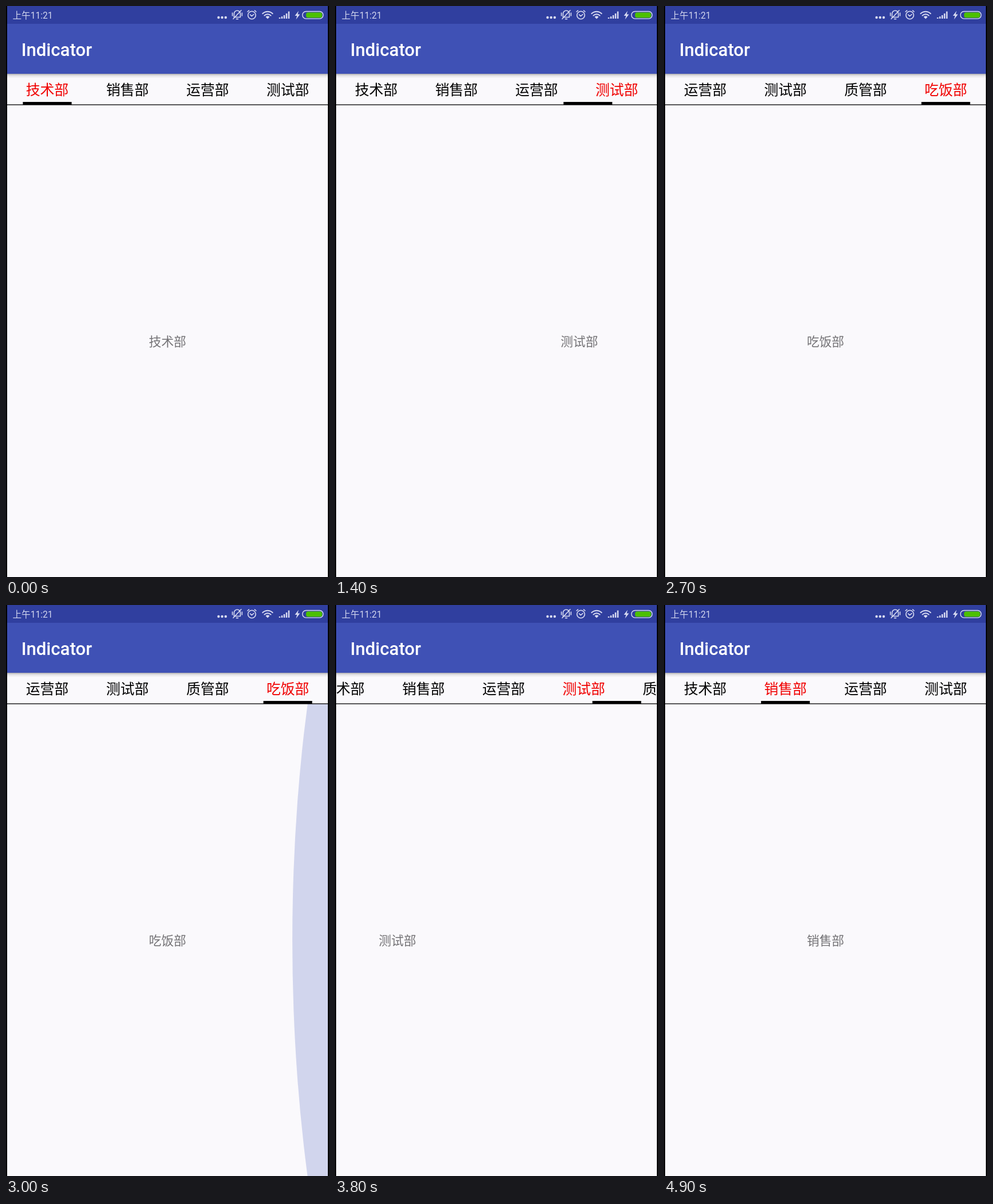
Write an HTML page that moves like this. It is 563 px wide and 994 px high and loops after 5100 ms.

```html
<!DOCTYPE html>
<html lang="zh-CN">
<head>
<meta charset="utf-8">
<title>Indicator</title>
<style>
html, body { margin: 0; width: 100%; height: 100%; overflow: hidden; background: #faf9fc; }
svg { display: block; font-family: "Noto Sans CJK SC", "Noto Sans CJK", "Noto Sans SC", sans-serif; }
.tab { font-size: 24.84px; text-anchor: middle; }
.page { font-size: 21.74px; text-anchor: middle; fill: #747376; }
.title { font: 500 31.06px Roboto, sans-serif; fill: #fff; }
.clock { font-family: Roboto, "Noto Sans CJK SC", "Noto Sans CJK", sans-serif; font-size: 15.6px; fill: #d3d7ef; }
.icons { fill: none; stroke: #d9dcf2; stroke-width: 1.6; stroke-linecap: round; stroke-linejoin: round; }
.icons .solid { fill: #d9dcf2; stroke: none; }
</style>
</head>
<body>
<svg width="563" height="994" viewBox="0 0 563 994">
  <defs>
    <linearGradient id="shade" x2="0" y2="1">
      <stop stop-color="#000" stop-opacity=".3"/>
      <stop offset=".4" stop-color="#000" stop-opacity=".09"/>
      <stop offset="1" stop-color="#000" stop-opacity="0"/>
    </linearGradient>
  </defs>
  <rect width="563" height="994" fill="#faf9fc"/>
  <g id="pages"></g>
  <ellipse id="glow" cy="583.5" ry="1231" fill="#3f51b5"/>

  <rect y="118" width="563" height="54" fill="#faf9fc"/>
  <g id="tabs"></g>
  <rect y="171.3" width="563" height="1.3"/>
  <rect id="bar" y="167" width="85" height="5"/>

  <rect y="118" width="563" height="8" fill="url(#shade)"/>
  <rect width="563" height="118" fill="#3f51b5"/>
  <rect width="563" height="31" fill="#303f9f"/>
  <text class="clock" x="11.5" y="22">上午11:21</text>
  <text class="title" x="26.8" y="87">Indicator</text>

  <g class="icons">
    <g class="solid">
      <circle cx="370.5" cy="20" r="2.2"/><circle cx="376.7" cy="20" r="2.2"/><circle cx="382.9" cy="20" r="2.2"/>
      <path d="M510 8.5L503.5 17H507.3L505.5 23.5L512.3 14.5H508.4Z"/>
    </g>
    <!-- muted bell -->
    <path d="M397.5 19.5V13.5A5.5 5.5 0 0 1 408.5 13.5V19.5H397.5M401.5 22.6H404.5M396 22.5L410 7.5M394.6 12V17M411.4 12V17"/>
    <!-- alarm clock -->
    <circle cx="428.5" cy="16" r="6.8"/>
    <path d="M425.5 15L428.3 17.7L432 14.5M421 10L423.5 7.8M436 10L433.5 7.8"/>
    <!-- wifi -->
    <path stroke-width="2" d="M447.3 13.2A12.5 12.5 0 0 1 464.7 13.2M450.4 16.6A8 8 0 0 1 461.6 16.6"/>
    <path class="solid" d="M452.5 19A5 5 0 0 1 459.5 19L456 22.5Z"/>
    <!-- signal -->
    <path stroke-width="2.5" stroke-linecap="butt" d="M477 22V20M481 22V18.3M485 22V16M489 22V13M493 22V9.5"/>
    <!-- battery -->
    <rect x="516.8" y="9.5" width="36" height="12.6" rx="6" stroke-width="1.4"/>
    <rect x="523" y="11.2" width="28" height="9.2" rx="3.5" fill="#4cc000" stroke="none"/>
  </g>
  <rect width="2" height="994"/>
  <rect x="561" width="2" height="994"/>
</svg>
<script>
const LOOP = 5100, TICK = 100;
const WIDTH = 559, TAB = WIDTH / 4, LEFT = 2;
const names = ['技术部', '销售部', '运营部', '测试部', '质管部', '吃饭部'];
// Each swipe: middle time, direction, delay of the tab strip behind the page (ms)
const swipes = [
  [560, 1, 17], [1019, 1, 17], [1358.3, 1, 19], [1902.8, 1, 10.4], [2440, 1, 17],
  [3400, -1, 17], [3768.2, -1, 17.6], [4244, -1, 17], [4628, -1, 17]
];

const get = id => document.getElementById(id);
const clamp = (v, lo, hi) => Math.min(hi, Math.max(lo, v));

function addLabels(group, type, step, y) {
  return names.map((name, i) => {
    const el = document.createElementNS('http://www.w3.org/2000/svg', 'text');
    el.setAttribute('class', type);
    el.setAttribute('x', LEFT + step * (i + 0.5));
    el.setAttribute('y', y);
    el.textContent = name;
    group.append(el);
    return el;
  });
}
const tabs = addLabels(get('tabs'), 'tab', TAB, 155.3);
addLabels(get('pages'), 'page', WIDTH, 592.2);

// Smooth swipe steps added up; tiny remainders snap to the resting page
function position(t, delayed) {
  const p = swipes.reduce((sum, [mid, dir, delay]) =>
    sum + dir / (1 + Math.exp((mid + (delayed ? delay : 0) - t) / 39.5)), 0);
  const rest = Math.round(p);
  return Math.abs(p - rest) < 0.006 ? rest : p;
}

function draw(t) {
  const page = position(t), strip = position(t, true);
  get('pages').setAttribute('transform', `translate(${-page * WIDTH})`);
  get('tabs').setAttribute('transform', `translate(${-clamp(strip - 3, 0, 2) * TAB})`);
  get('bar').setAttribute('x', 29.4 + Math.min(strip, 3) * TAB);
  tabs.forEach((el, i) => el.setAttribute('fill', i === Math.round(page) ? '#f00000' : '#000'));

  // Edge glow when pulling past the last page
  const pull = clamp(Math.min((t - 2850) / 150, (3250 - t) / 250), 0, 1);
  const scale = 0.375 * pull;
  get('glow').setAttribute('cx', LEFT + WIDTH + 1066 * scale);
  get('glow').setAttribute('rx', 1231 * scale);
  get('glow').setAttribute('opacity', 0.22 * pull);
}

const start = performance.now();
function frame() {
  const t = (performance.now() - start) % LOOP;
  draw(Math.floor(t / TICK) * TICK);
  requestAnimationFrame(frame);
}
frame();
</script>
</body>
</html>
```
